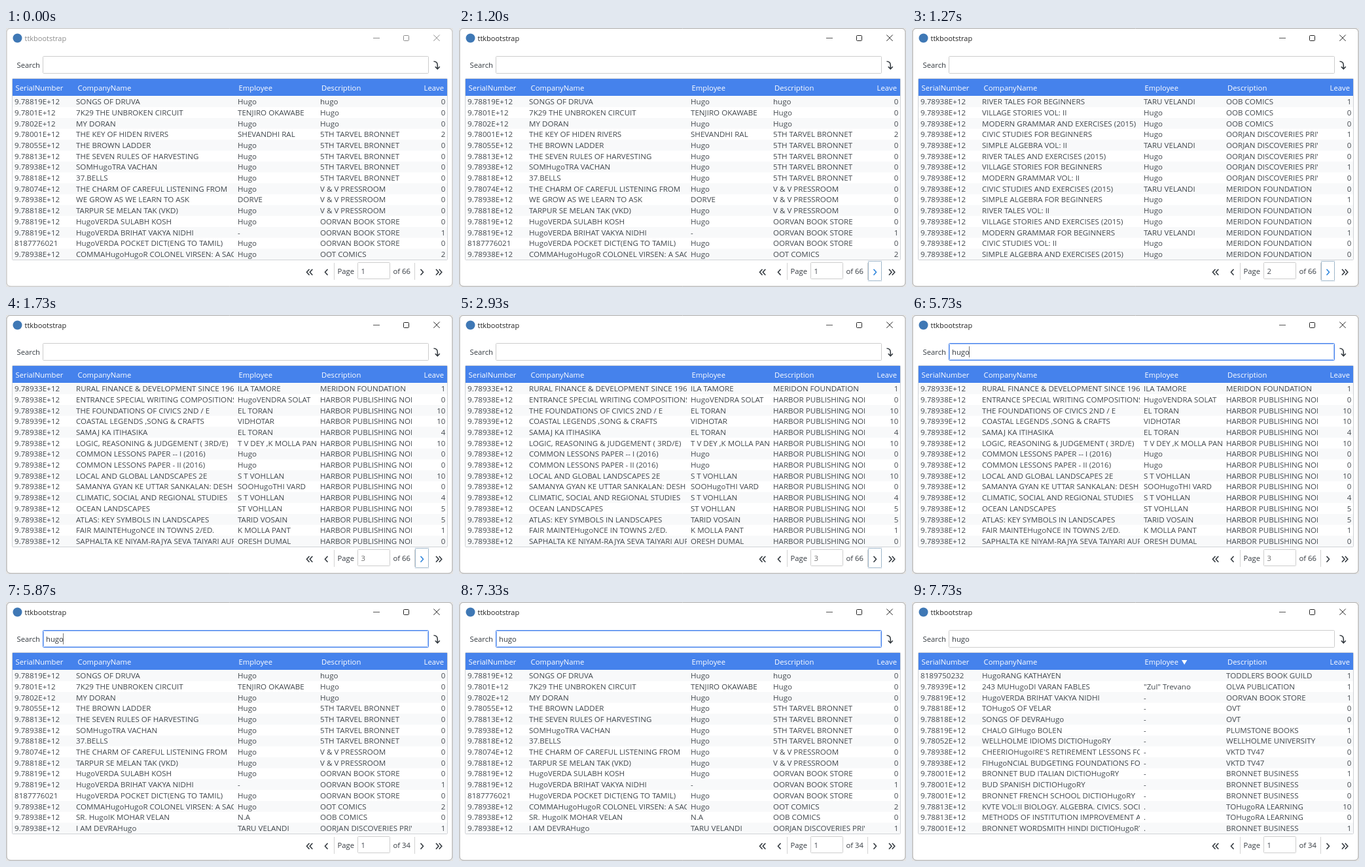
Recreate the animation shown at these times as an HTML page with a canvas. Size 683x397 px, loop 8000 ms.

```html
<!DOCTYPE html>
<html lang="en">
<head>
<meta charset="utf-8">
<title>ttkbootstrap</title>
<style>
html, body { margin: 0; width: 100%; height: 100%; overflow: hidden; background: #e4e4e4; }
canvas { display: block; width: 683px; height: 397px; }
</style>
</head>
<body>
<canvas id="stage" width="683" height="397"></canvas>
<script>
const ctx = document.getElementById('stage').getContext('2d');
const LOOP = 8000;
const BLUE = '#4582ec', HOVER = '#2f86dc', INK = '#343a40', EDGE = '#cdcdcd';
const FONT = '"Open Sans", "Noto Sans", sans-serif';
const QUERY = 'hugo';

// serial;company;employee;description;leave
const parse = text => text.trim().split('\n').map(line => {
  const row = line.split(';');
  if (row[0].length < 10) row[0] = `9.${row[0]}E+12`;
  return row;
});

const firstPage = parse(`
78819;SONGS OF DRUVA;Hugo;hugo;0
7801;7K29 THE UNBROKEN CIRCUIT;TENJIRO OKAWABE;Hugo;0
7802;MY DORAN;Hugo;Hugo;0
78001;THE KEY OF HIDEN RIVERS;SHEVANDHI RAL;5TH TARVEL BRONNET;2
78055;THE BROWN LADDER;Hugo;5TH TARVEL BRONNET;0
78813;THE SEVEN RULES OF HARVESTING;Hugo;5TH TARVEL BRONNET;0
78938;SOMHugoTRA VACHAN;Hugo;5TH TARVEL BRONNET;0
78818;37.BELLS;Hugo;5TH TARVEL BRONNET;0
78074;THE CHARM OF CAREFUL LISTENING FROM;Hugo;V & V PRESSROOM;0
78938;WE GROW AS WE LEARN TO ASK;DORVE;V & V PRESSROOM;0
78818;TARPUR SE MELAN TAK (VKD);Hugo;V & V PRESSROOM;0
78819;HugoVERDA SULABH KOSH;Hugo;OORVAN BOOK STORE;0
78819;HugoVERDA BRIHAT VAKYA NIDHI;-;OORVAN BOOK STORE;1
8187776021;HugoVERDA POCKET DICT(ENG TO TAMIL);Hugo;OORVAN BOOK STORE;0
78938;COMMAHugoHugoR COLONEL VIRSEN: A SAGA OF;Hugo;OOT COMICS;2`);

const thirdPage = parse(`
78933;RURAL FINANCE & DEVELOPMENT SINCE 1962;ILA TAMORE;MERIDON FOUNDATION;1
78938;ENTRANCE SPECIAL WRITING COMPOSITIONS;HugoVENDRA SOLAT;HARBOR PUBLISHING NORTH;0
78938;THE FOUNDATIONS OF CIVICS 2ND / E;EL TORAN;HARBOR PUBLISHING NORTH;10
78939;COASTAL LEGENDS ,SONG & CRAFTS;VIDHOTAR;HARBOR PUBLISHING NORTH;10
78938;SAMAJ KA ITIHASIKA;EL TORAN;HARBOR PUBLISHING NORTH;4
78938;LOGIC, REASONING & JUDGEMENT ( 3RD/E);T V DEY ,K MOLLA PANT;HARBOR PUBLISHING NORTH;10
78938;COMMON LESSONS PAPER -- I (2016);Hugo;HARBOR PUBLISHING NORTH;0
78938;COMMON LESSONS PAPER - II (2016);Hugo;HARBOR PUBLISHING NORTH;0
78938;LOCAL AND GLOBAL LANDSCAPES 2E;S T VOHLLAN;HARBOR PUBLISHING NORTH;10
78938;SAMANYA GYAN KE UTTAR SANKALAN: DESH;SOOHugoTHI VARD;HARBOR PUBLISHING NORTH;0
78938;CLIMATIC, SOCIAL AND REGIONAL STUDIES;S T VOHLLAN;HARBOR PUBLISHING NORTH;4
78938;OCEAN LANDSCAPES;ST VOHLLAN;HARBOR PUBLISHING NORTH;5
78938;ATLAS: KEY SYMBOLS IN LANDSCAPES;TARID VOSAIN;HARBOR PUBLISHING NORTH;5
78938;FAIR MAINTEHugoNCE IN TOWNS 2/ED.;K MOLLA PANT;HARBOR PUBLISHING NORTH;1
78938;SAPHALTA KE NIYAM-RAJYA SEVA TAIYARI AUR;ORESH DUMAL;HARBOR PUBLISHING NORTH;0`);

const extraMatches = parse(`
78938;SR. HugoIK MOHAR VELAN;N.A;OOB COMICS;0
78938;I AM DEVRAHugo;TARU VELANDI;OORJAN DISCOVERIES PRIVATE;1`);

const sortedPage = parse(`
8189750232;HugoRANG KATHAYEN;;TODDLERS BOOK GUILD;1
78939;243 MUHugoDI VARAN FABLES;"Zul" Trevano;OLVA PUBLICATION;1
78819;HugoVERDA BRIHAT VAKYA NIDHI;-;OORVAN BOOK STORE;1
78818;TOHugoS OF VELAR;-;OVT;0
78818;SONGS OF DEVRAHugo;-;OVT;0
78819;CHALO GIHugo BOLEN;-;PLUMSTONE BOOKS;1
78052;WELLHOLME IDIOMS DICTIOHugoRY;-;WELLHOLME UNIVERSITY PRESS;0
78938;CHEERIOHugoIRE'S RETIREMENT LESSONS FOR;-;VKTD TV47;0
78938;FIHugoNCIAL BUDGETING FOUNDATIONS FOR DO;-;VKTD TV47;0
78001;BRONNET BUD ITALIAN DICTIOHugoRY;-;BRONNET BUSINESS;1
78001;BUD SPANISH DICTIOHugoRY;-;BRONNET BUSINESS;0
78001;BRONNET FRENCH SCHOOL DICTIOHugoRY;-;BRONNET BUSINESS;0
78813;KVTE VOL:II BIOLOGY. ALGEBRA. CIVICS. SOCIAL;.;TOHugoRA LEARNING;10
78813;METHODS OF INSTITUTION IMPROVEMENT A;.;TOHugoRA LEARNING;0
78001;BRONNET WORDSMITH HINDI DICTIOHugoRY;.;BRONNET BUSINESS;1`);

const topics = ['RIVER TALES', 'MODERN GRAMMAR', 'SIMPLE ALGEBRA', 'VILLAGE STORIES', 'CIVIC STUDIES'];
const suffixes = [' FOR BEGINNERS', ' VOL: II', ' AND EXERCISES (2015)'];
const secondPage = Array.from({ length: 15 }, (_, i) => [
  '9.78938E+12', topics[i * 3 % 5] + suffixes[i % 3],
  i % 4 ? 'Hugo' : 'TARU VELANDI',
  i < 3 ? 'OOB COMICS' : i < 8 ? 'OORJAN DISCOVERIES PRIVATE' : 'MERIDON FOUNDATION',
  String(i % 3 ? 0 : 1)
]);

const matches = firstPage.filter(row => /hugo/i.test(row.join())).concat(extraMatches);

const columns = [
  { name: 'SerialNumber', x: 13, head: 14.5, left: 11, end: 103 },
  { name: 'CompanyName', x: 107, head: 109.5, left: 105, end: 348 },
  { name: 'Employee', x: 354, head: 355.5, left: 352, end: 475 },
  { name: 'Description', x: 480, head: 482, left: 478, end: 620 },
  { name: 'Leave', x: 671.5, head: 669, left: 622, end: 674, align: 'right' }
];

const within = (t, from, to) => t >= from && t < to;

function label(text, x, y, color = INK, size = 11.3, align = 'left') {
  ctx.font = `${size}px ${FONT}`;
  ctx.fillStyle = color;
  ctx.textAlign = align;
  ctx.fillText(text, x, y);
}

function box(x, y, w, h, color) {
  ctx.fillStyle = color;
  ctx.fillRect(x, y, w, h);
}

function frame(x, y, w, h, color) {
  ctx.strokeStyle = color;
  ctx.lineWidth = 1;
  ctx.beginPath();
  ctx.roundRect(x, y, w, h, 1);
  ctx.stroke();
}

function line(points, color, width = 1) {
  ctx.strokeStyle = color;
  ctx.lineWidth = width;
  ctx.beginPath();
  points.forEach(([x, y]) => ctx.lineTo(x, y));
  ctx.stroke();
}

function chevron(x, dir, color = INK) {
  line([[x - 2 * dir, 369.8], [x + 2 * dir, 374.3], [x - 2 * dir, 378.8]], color, 1.6);
}

function drawWindow(active) {
  box(0, 0, 683, 397, '#e4e4e4');
  ctx.beginPath();
  ctx.roundRect(1, 0.5, 681, 395.5, 6);
  ctx.fillStyle = '#fff';
  ctx.fill();
  ctx.strokeStyle = active ? '#a6a6a6' : '#bcbcbc';
  ctx.lineWidth = 1;
  ctx.stroke();

  ctx.fillStyle = '#3f78b5';
  ctx.beginPath();
  ctx.arc(17.5, 15.5, 7, 0, 7);
  ctx.fill();

  const color = active ? '#222' : '#8c8c8c';
  label('ttkbootstrap', 28.5, 20, color, 11);
  line([[561, 15.5], [571, 15.5]], active ? '#555' : color);
  frame(607.5, 11.5, 8, 8, color);
  line([[653.3, 10.5], [662.7, 20]], color);
  line([[662.7, 10.5], [653.3, 20]], color);
}

function drawSearch(t) {
  const focus = within(t, 3930, 7730);
  const typed = QUERY.slice(0, [5530, 5600, 5670, 5730].filter(at => t >= at).length);
  const blinkOff = within(t, 4530, 4870) || within(t, 5470, 5530) ||
    within(t, 6400, 6670) || within(t, 7330, 7600);

  label('Search', 16.5, 61);
  frame(56.5, 43.5, 589, 26, focus ? BLUE : within(t, 3130, 3930) ? '#a8b4c4' : EDGE);
  if (focus) frame(57.5, 44.5, 587, 24, '#a2c1f6');
  label(typed, 61, 61);
  if (focus && !blinkOff) box(Math.round(60.5 + ctx.measureText(typed).width), 48, 1, 17, '#777');

  ctx.strokeStyle = INK;
  ctx.lineWidth = 1.6;
  ctx.beginPath();
  ctx.moveTo(653.5, 51.3);
  ctx.quadraticCurveTo(659.3, 51.3, 659.3, 57);
  ctx.lineTo(659.3, 62);
  ctx.moveTo(655.8, 59.3);
  ctx.lineTo(659.3, 62.8);
  ctx.lineTo(662.8, 59.3);
  ctx.stroke();
}

function drawTable(rows, sorted) {
  const pitch = 16.7, top = 104.5;
  rows.forEach((row, i) => {
    if (i % 2 === 0) box(10, top + i * pitch, 664, pitch, '#f8f9fa');
    columns.forEach((col, c) => {
      ctx.save();
      ctx.beginPath();
      ctx.rect(col.left, top, col.end - col.left, 251);
      ctx.clip();
      label(row[c], col.x, top + i * pitch + 12.6, '#42484e', 11.6, col.align);
      ctx.restore();
    });
  });
  frame(9.5, 77.5, 665, 278, '#cfd2d6');
  box(10, 78, 664, 26, BLUE);
  columns.forEach(col => label(col.name, col.head, 96, '#fff', 11.3, col.align));
  if (sorted) {
    ctx.beginPath();
    [[412, 89], [420.4, 89], [416.2, 96]].forEach(([x, y]) => ctx.lineTo(x, y));
    ctx.fill();
  }
}

function drawPager(t, page, total) {
  chevron(461.5, -1);
  chevron(466.3, -1);
  chevron(489.5, -1);
  line([[501.5, 360], [501.5, 386]], '#d2d2d2');
  label('Page', 506.5, 377.2);
  frame(537.5, 359.5, 49, 25, EDGE);
  label(page, 542.5, 377.2, page === 3 ? '#6c6c6c' : '#444a52');
  label(`of ${total}`, 591.5, 377.2);
  line([[624.5, 360], [624.5, 386]], '#d2d2d2');
  chevron(635.5, 1, within(t, 930, 1930) ? HOVER : INK);
  chevron(659, 1);
  chevron(663.8, 1);
  if (within(t, 1200, 3930)) {
    ctx.setLineDash([1, 1]);
    ctx.lineDashOffset = 0.5;
    ctx.strokeStyle = '#3f6f96';
    ctx.lineWidth = 1;
    ctx.strokeRect(625.5, 357.5, 20, 30);
    ctx.setLineDash([]);
  }
}

function draw(t) {
  const filtered = t >= 5870, sorted = t >= 7730;
  const page = filtered || t < 1270 ? 1 : t < 1730 ? 2 : 3;
  const rows = sorted ? sortedPage : filtered ? matches : [firstPage, secondPage, thirdPage][page - 1];
  drawWindow(t >= 1200);
  drawSearch(t);
  drawTable(rows, sorted);
  drawPager(t, page, filtered ? 34 : 66);
}

const start = performance.now();
function tick() {
  draw((performance.now() - start) % LOOP);
  requestAnimationFrame(tick);
}
tick();
</script>
</body>
</html>
```
